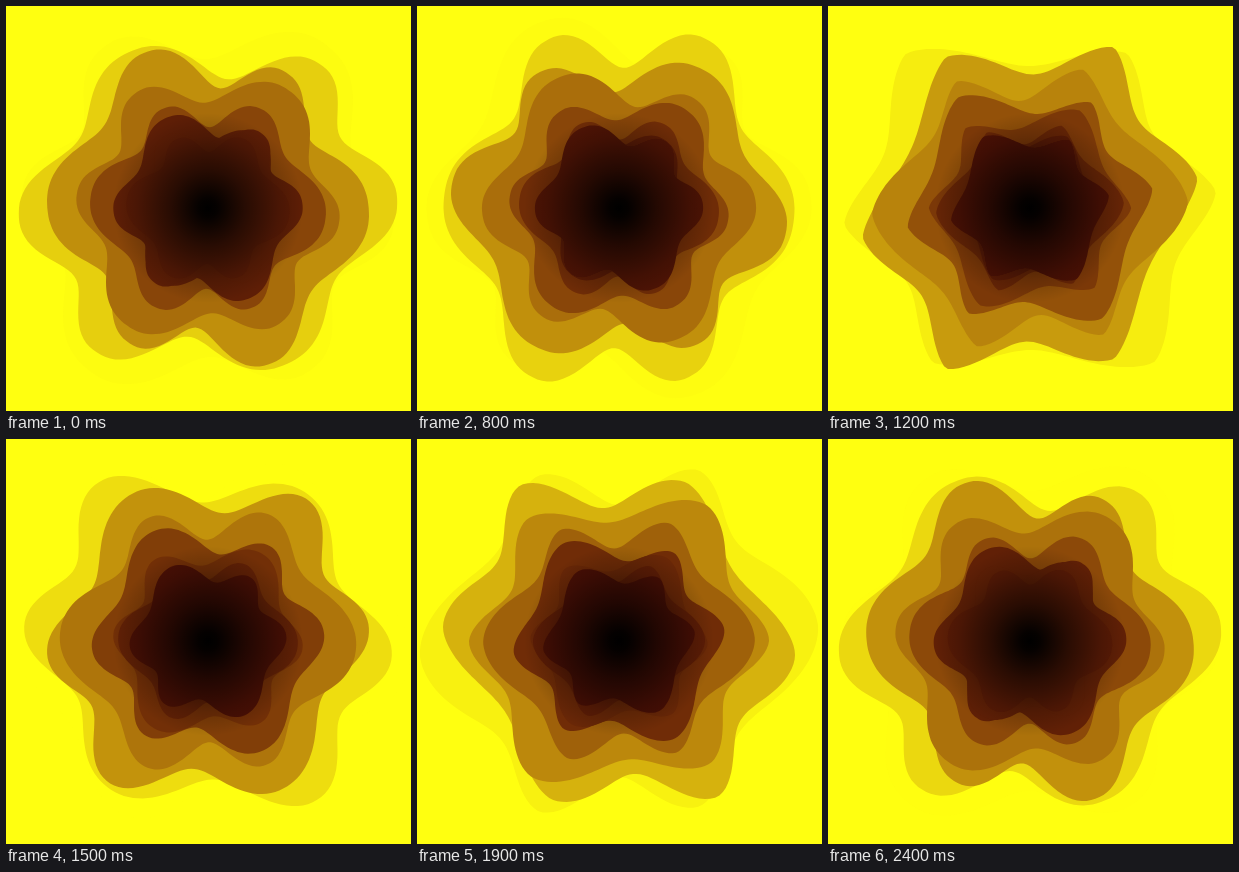
These frames come from a looping animation (405x405 px, 2.5 s). An HTML page:

```html
<!DOCTYPE html>
<html lang="en">
<head>
<meta charset="utf-8">
<title>Tunnel</title>
<style>
  html, body { margin: 0; width: 100%; height: 100%; overflow: hidden; background: #ffff10; }
  svg { display: block; width: 100vw; height: 100vh; }
  path { mix-blend-mode: darken; }
</style>
</head>
<body>
<svg viewBox="0 0 405 405">
  <defs>
    <radialGradient id="core" gradientUnits="userSpaceOnUse" cx="202" cy="202" r="95">
      <stop offset="0" stop-color="#000"/>
      <stop offset=".1" stop-color="#000" stop-opacity=".94"/>
      <stop offset=".4" stop-color="#000" stop-opacity=".55"/>
      <stop offset=".75" stop-color="#000" stop-opacity=".18"/>
      <stop offset="1" stop-color="#000" stop-opacity="0"/>
    </radialGradient>
  </defs>
  <rect width="405" height="405" fill="#ffff10"/>
  <g id="layers"></g>
  <circle cx="202" cy="202" r="95" fill="url(#core)"/>
</svg>
<script>
const LOOP = 2500, STEP = 100, KINDS = 3, COUNT = 8;
const PERIOD = LOOP / KINDS;
const CENTER = 202;
const DARK_KIND = 2;

const rad = degrees => degrees * Math.PI / 180;
const clamp = x => Math.min(1, Math.max(0, x));

// Layers sink from the rim to the core along an S-curve.
const radiusAt = age => 72 + 134 / (1 + Math.exp(.75 * (age - 1.4)));

function colorAt(age, kind) {
  const fall = age < 0
    ? 196 + 59 * (1 - Math.exp(1.8 * age))
    : 88 + 108 * Math.exp(-((age / 2.8) ** 2));
  const red = fall - (kind === DARK_KIND ? 16 * clamp(age - 1.5) : 0);
  const green = red * red / 255 - 8 * (1 - red / 255);
  return `rgb(${Math.round(red)},${Math.round(green)},${Math.round(red / 16)})`;
}

// Six lobes with half-turn symmetry; each layer sways and stretches in its own phase.
function outline(n, age) {
  const radius = radiusAt(age);
  const beat = Math.cos(2 * Math.PI * age);
  const sharpness = 1.9 - .6 * beat;
  const swayPhase = rad(-75 - 120 * n + 150 * Math.min(age, 1));
  const stretchPhase = rad(-20 - 120 * n);
  const points = [];
  for (let degrees = 0; degrees < 360; degrees += 1.5) {
    const a = rad(degrees);
    const sway = rad(-.5 - 3.5 * beat + 6 * Math.cos(2 * a - swayPhase));
    const lobe = 1 - Math.abs(Math.sin(3 * (a - sway))) ** sharpness;
    const valley = .785 + .035 * Math.cos(2 * a);
    const stretch = 1 + .045 * Math.cos(2 * a - stretchPhase);
    const r = radius * stretch * (valley + (1.01 - valley) * lobe);
    points.push(`${(CENTER + r * Math.cos(a)).toFixed(1)} ${(CENTER + r * Math.sin(a)).toFixed(1)}`);
  }
  return `M${points.join("L")}Z`;
}

const group = document.getElementById("layers");
const paths = Array.from({ length: COUNT }, () =>
  group.appendChild(document.createElementNS("http://www.w3.org/2000/svg", "path")));

function render(time) {
  const t = Math.floor(time % LOOP / STEP) * STEP;
  const head = (t - 400) / PERIOD;
  const newest = Math.floor(head + 1.7);
  paths.forEach((path, i) => {
    const n = newest - i, age = head - n;
    const kind = (n % KINDS + KINDS) % KINDS;
    path.setAttribute("d", outline(n, age));
    path.setAttribute("fill", colorAt(age, kind));
    path.setAttribute("opacity", clamp((age + 1.7) * 2));
  });
}

const start = performance.now();
function tick() {
  render(performance.now() - start);
  requestAnimationFrame(tick);
}
tick();
</script>
</body>
</html>
```
